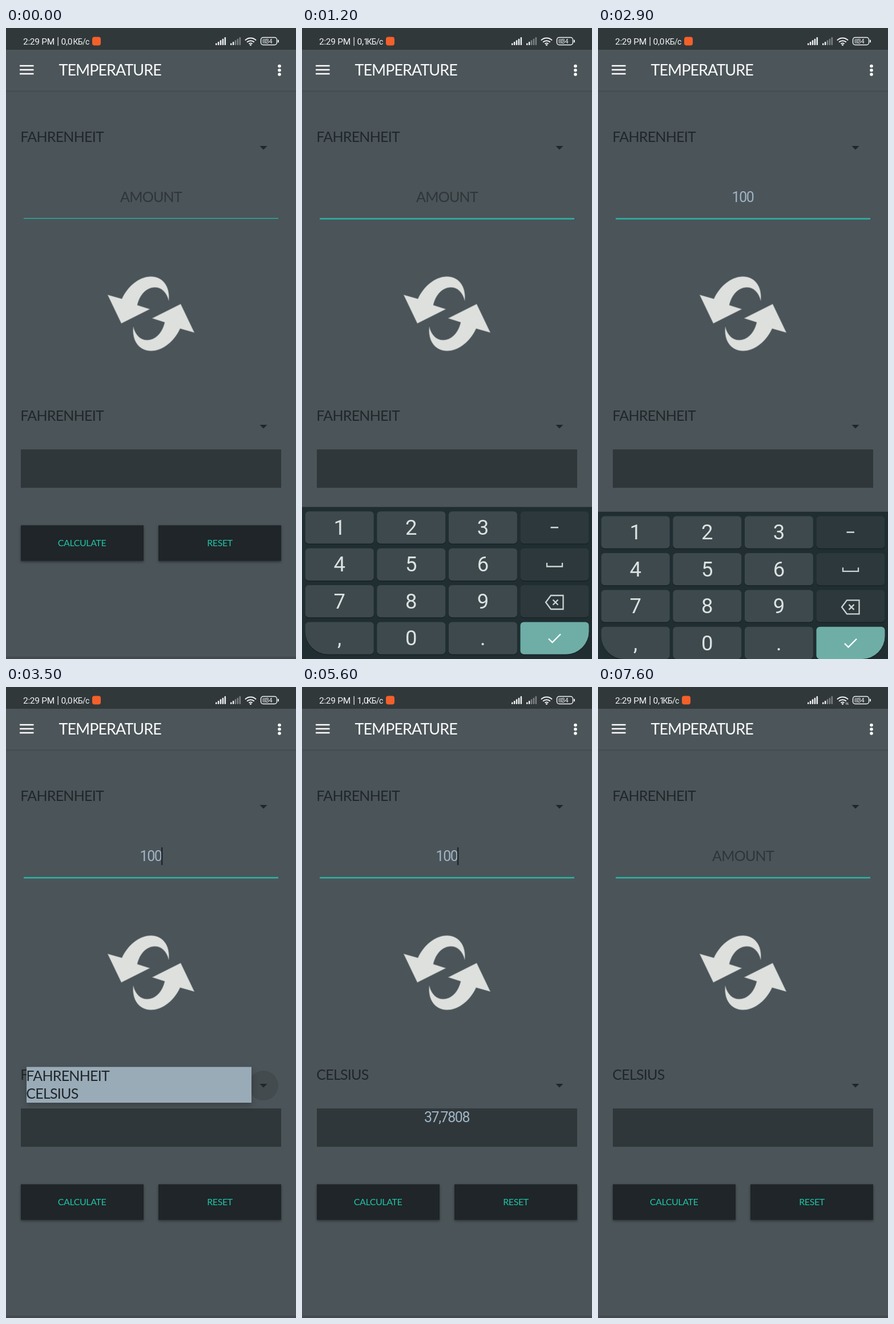
Animation of 508x1102 px, one loop 7700 ms. Source, as an HTML page:

```html
<!DOCTYPE html>
<html lang="en">
<head>
<meta charset="utf-8">
<title>Temperature converter</title>
<style>
  html, body { margin: 0; width: 100%; height: 100%; overflow: hidden; background: #4b5459; }
  svg { display: block; width: 508px; height: 1102px; }
  text { font-family: Lato, "Open Sans", sans-serif; letter-spacing: -.03em; white-space: pre; }
  .label { font-size: 25px; fill: #20272a; }
  .num, .status, .digit { font-family: Roboto, "Open Sans", sans-serif; }
  .num { font-size: 25px; fill: #9fb4c4; letter-spacing: -.058em; text-anchor: middle; }
  .mid { text-anchor: middle; }
  .status { font-size: 15.5px; fill: #f1f3f3; letter-spacing: -.02em; }
  .unit { font-size: 14px; letter-spacing: -.05em; }
  .btn { font-size: 16px; fill: #20c2a6; text-anchor: middle; letter-spacing: -.025em; }
  .digit { font-size: 36.5px; fill: #dce2e1; text-anchor: middle; letter-spacing: 0; }
  .line { fill: none; stroke: #ccd3d3; stroke-width: 2.3; }
  .raised { filter: drop-shadow(0 2px 2px rgba(0,0,0,.4)); }
  #popup { filter: drop-shadow(0 5px 6px rgba(0,0,0,.22)); }
</style>
</head>
<body>
<svg viewBox="0 0 508 1102" xmlns="http://www.w3.org/2000/svg">
  <defs>
    <linearGradient id="edge" x2="0" y2="1">
      <stop offset="0" stop-color="#434b4f"/>
      <stop offset="1" stop-color="#4b5459"/>
    </linearGradient>
    <path id="turn" d="M178 466L203 473C212 453 232 434 254 434C274 434 288 451 285 476C281 461 272 453 261 453C246 453 234 466 230 484L252 491L202 516Z"/>
    <path id="drop" d="M444.500 206h13l-6.500 6.500z" fill="#20272a"/>
  </defs>
  <rect width="508" height="1102" fill="#4b5459"/>
  <rect y="1098" width="508" height="4" fill="#434b4f"/>

  <!-- status bar -->
  <rect width="508" height="38" fill="#31383a"/>
  <text class="status" x="30" y="28.500">2:29 PM</text>
  <rect x="90.500" y="16" width="1.300" height="15" fill="#e4e8e8"/>
  <text class="status" id="rate" x="96.500" y="28.500"></text>
  <g id="unit">
    <text class="status unit" x="117.500" y="28.500">КБ/с</text>
    <rect x="151" y="15.500" width="15" height="15" rx="4" fill="#f4602a"/>
  </g>
  <g id="bars" fill="#eef1f1"></g>
  <g fill="none" stroke="#eef1f1" stroke-width="2">
    <path d="M419 21.500a13.400 13.400 0 0 1 19 0M422.200 24.800a8.900 8.900 0 0 1 12.600 0M425.500 27.700a4.300 4.300 0 0 1 6 0"/>
    <circle cx="428.500" cy="29.500" r=".6"/>
    <rect x="446.500" y="16.500" width="28" height="13" rx="4" stroke-width="1.500"/>
  </g>
  <rect x="449" y="19" width="7.500" height="8" rx="2" fill="#7c8486"/>
  <rect x="476" y="20.500" width="2" height="5" rx="1" fill="#eef1f1"/>
  <text class="status mid" x="460.500" y="27" style="font-size:11px">34</text>
  <path id="traffic" d="M435 31v-4l-1 1M437.500 27v4l1-1" fill="none" stroke="#dfe4e4"/>

  <!-- toolbar -->
  <rect y="38" width="508" height="71" fill="#4c5559"/>
  <rect y="109" width="508" height="4" fill="url(#edge)"/>
  <path d="M24 66h24.500M24 73h24.500M24 80h24.500" stroke="#fff" stroke-width="2.400"/>
  <text x="92.500" y="83" font-size="27" fill="#fafbfb" style="letter-spacing:-.036em">TEMPERATURE</text>
  <g fill="#fff">
    <circle cx="479" cy="66.500" r="2.800"/><circle cx="479" cy="73.700" r="2.800"/><circle cx="479" cy="81" r="2.800"/>
  </g>

  <!-- form -->
  <text class="label" x="25.300" y="199">FAHRENHEIT</text>
  <use href="#drop"/>
  <text class="label mid" id="hint" x="254" y="304" style="fill:#2e3639">AMOUNT</text>
  <text class="num" id="amount" x="253.500" y="304"></text>
  <rect id="caret" y="280" width="2.500" height="31" fill="#20272a"/>
  <rect id="underline" x="31" y="331.800" width="446" fill="#2bb3a2"/>
  <g fill="#dde0dd" stroke="#858d8d" stroke-width=".8">
    <use href="#turn"/><use href="#turn" transform="rotate(180 254 499)"/>
  </g>
  <text class="label" id="target" x="25.300" y="686"></text>
  <circle id="ripple" cx="451" cy="696" r="26"/>
  <use href="#drop" y="487"/>
  <rect x="26" y="736" width="456" height="67" fill="#30373a"/>
  <text class="num" id="result" x="253.500" y="760"></text>
  <g class="raised" fill="#1f2528">
    <rect x="26" y="868.500" width="215" height="62"/><rect x="267" y="868.500" width="215" height="62"/>
  </g>
  <text class="btn" x="133" y="904.500">CALCULATE</text>
  <text class="btn" x="374.500" y="904.500">RESET</text>

  <g id="popup">
    <rect x="26" y="662" width="394" height="62.500" fill="#9aabb8"/>
    <g id="pick">
      <rect x="26" y="693" width="394" height="31.500" opacity=".06"/>
      <rect x="30" y="693" width="387" height="31.500" opacity=".13"/>
    </g>
    <text class="label" x="25.300" y="686">FAHRENHEIT</text>
    <text class="label" x="25.300" y="717">CELSIUS</text>
  </g>

  <g id="keyboard">
    <rect y="836.500" width="508" height="270" fill="#202d31"/>
    <g id="keys"></g>
    <rect x="435.500" y="871" width="13.500" height="2.600" fill="#ccd3d3"/>
    <path class="line" d="M429 934v6.500h27v-6.500"/>
    <path class="line" d="M427 1003l9-12h21.500v24h-21.500zM439.500 998.500l9 9M448.500 998.500l-9 9"/>
    <path class="line" d="M432 1066.500l6.500 6.500 14.500-14.500" style="stroke:#fff"/>
  </g>
</svg>
<script>
const LOOP = 7700, STEP = 100;
const $ = id => document.getElementById(id);
const clamp = v => Math.max(0, Math.min(1, v));
const show = (id, on) => $(id).style.display = on ? '' : 'none';
const make = (parent, tag, attrs, text = '') => {
  const el = document.createElementNS('http://www.w3.org/2000/svg', tag);
  for (const k in attrs) el.setAttribute(k, attrs[k]);
  el.textContent = text;
  parent.append(el);
  return el;
};

// Steps are [start time, value]; the last one reached holds.
const steps = {
  rate: [[0, '0,0'], [500, '0,1'], [2000, '0,0'], [4900, '1,0'], [5700, '0,0'], [6900, '0,1']],
  amount: [[0, ''], [1600, '1'], [1800, '10'], [2000, '100'], [7000, '']],
  result: [[0, ''], [5400, '37,7808'], [7000, '']],
  target: [[0, 'FAHRENHEIT'], [4600, 'CELSIUS']],
  caret: [[0, 0], [700, 1], [1200, 0], [1600, 1], [2800, 0], [3300, 1], [5100, 0],
          [5600, 1], [6100, 0], [6600, 1], [7500, 0]],
  key: [[0, ''], [1600, '1'], [1700, ''], [1800, '0'], [1900, ''], [2000, '0'], [2100, ''],
        [2200, 'ok'], [2300, '']]
};
const at = (name, t) => steps[name].reduce((v, [start, next]) => t >= start ? next : v, '');

// Signal strength bars
for (let i = 0; i < 10; i++) {
  const n = i % 5, h = 3.5 + n * 2.6, second = i > 4;
  make($('bars'), 'rect', {
    x: (second ? 393 : 367) + n * 3.9, y: 30 - h, width: 2.5, height: h, rx: 1,
    opacity: second && n > 1 ? 0.4 : 1
  });
}

// Keypad
const keys = {};
['1', '2', '3', '-', '4', '5', '6', 'space', '7', '8', '9', 'del', ',', '0', '.', 'ok'].forEach((name, i) => {
  const col = i % 4, row = i >> 2;
  const x = 5.7 + col * 125.6, y = 844.3 + row * 64.4, w = 120, h = 56.2;
  const bl = name === ',' ? 40 : 6, br = name === 'ok' ? 40 : 6;
  const arc = (r, dx, dy) => `a${r} ${r} 0 0 1 ${dx} ${dy}`;
  const d = `M${x + 6} ${y}h${w - 12}${arc(6, 6, 6)}v${h - 6 - br}${arc(br, -br, br)}` +
    `h${br + bl - w}${arc(bl, -bl, -bl)}v${bl + 6 - h}${arc(6, 6, -6)}z`;
  const fill = name === 'ok' ? '#6eaea7' : col === 3 ? '#2d383d' : '#3d494d';
  make($('keys'), 'path', { d, fill: '#172226', transform: 'translate(0 1.5)' });
  keys[name] = make($('keys'), 'path', { d, fill });
  if (col < 3) make($('keys'), 'text', { class: 'digit', x: x + w / 2, y: y + 40.7 }, name);
});

function keyboardShift(t) {
  const enter = (1 - clamp((t - 800) / 400)) ** 3;
  const leave = clamp((t - 2800) / 400) ** 2.5;
  return 266 * (t < 2000 ? enter : leave);
}

function render(t) {
  const rate = at('rate', t), amount = at('amount', t), pressed = at('key', t);
  $('rate').textContent = rate;
  $('unit').setAttribute('transform', `translate(${rate.includes('1') ? -4 : 0} 0)`);
  show('traffic', t >= 6400);

  $('amount').textContent = amount;
  show('hint', !amount);
  show('caret', at('caret', t));
  $('caret').setAttribute('x', 253 + amount.length * 6.3);
  $('underline').setAttribute('height', t < 700 ? 1.4 : 2.6);
  $('target').textContent = at('target', t);
  $('result').textContent = at('result', t);

  const shift = keyboardShift(t);
  show('keyboard', shift < 266);
  $('keyboard').setAttribute('transform', `translate(0 ${shift})`);
  for (const name in keys) keys[name].style.filter = name === pressed ? 'brightness(1.25)' : '';

  $('ripple').setAttribute('opacity', t < 3400 ? 0 : 0.11 * (1 - clamp((t - 3500) / 400)));
  const settle = (1 - clamp((t - 3500) / 200)) ** 2;
  const fade = 1 - clamp((t - 4400) / 300) ** 1.1;
  show('popup', t >= 3500 && t < 4700);
  $('popup').setAttribute('transform', `translate(${10 * settle} ${1.5 * settle})`);
  $('popup').setAttribute('opacity', fade);
  show('pick', t >= 4300);
}

const origin = performance.now();
function tick() {
  const t = (performance.now() - origin) % LOOP;
  render(Math.floor(t / STEP) * STEP);
  requestAnimationFrame(tick);
}
tick();
</script>
</body>
</html>
```
